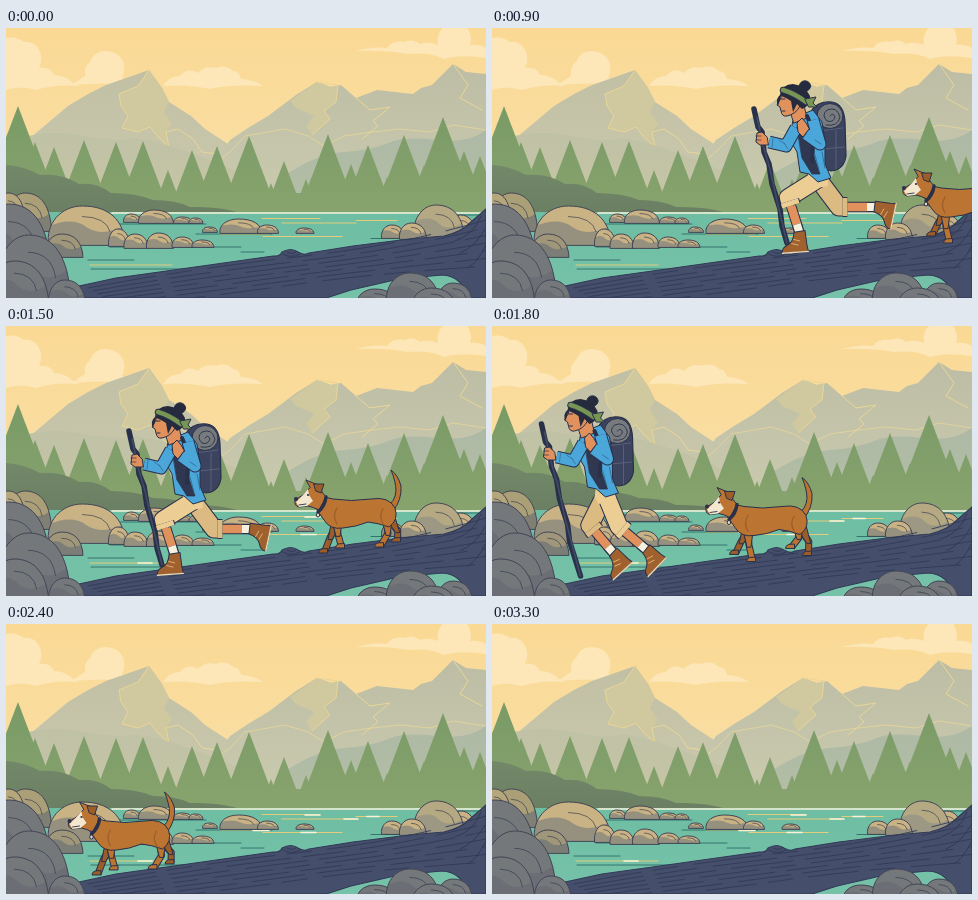
These frames come from a looping animation (480x270 px, 3600 ms). An HTML page with a canvas:

```html
<!DOCTYPE html>
<html lang="en">
<head>
<meta charset="utf-8">
<title>River hike</title>
<style>
html, body { margin: 0; height: 100%; overflow: hidden; background: #fbda95; }
canvas { display: block; width: 100vw; height: 100vh; }
</style>
</head>
<body>
<canvas id="stage" width="480" height="270"></canvas>
<script>
const canvas = document.getElementById('stage');
const ctx = canvas.getContext('2d');
const LOOP = 3600, STEP = 150;
const INK = '#29304a';

const mix = (a, b, k) => a + (b - a) * k;

function shape(d, fill, line, width = 1) {
  const path = new Path2D(d);
  if (fill) { ctx.fillStyle = fill; ctx.fill(path); }
  if (line) { ctx.strokeStyle = line; ctx.lineWidth = width; ctx.stroke(path); }
}

function oval(x, y, rx, ry, fill, line = INK) {
  ctx.beginPath();
  ctx.ellipse(x, y, rx, ry, 0, 0, Math.PI * 2);
  ctx.fillStyle = fill;
  ctx.fill();
  if (line) { ctx.strokeStyle = line; ctx.lineWidth = 1; ctx.stroke(); }
}

// Outlined tube through a list of points
function limb(points, width, color) {
  const d = 'M' + points.map(p => p.join(' ')).join('L');
  ctx.lineCap = 'butt';
  shape(d, null, INK, width + 2);
  shape(d, null, color, width);
  ctx.lineCap = 'round';
}

function at(x, y, angle, draw) {
  ctx.save();
  ctx.translate(x, y);
  ctx.rotate(angle * Math.PI / 180);
  draw();
  ctx.restore();
}

function fade(y0, y1, top, bottom) {
  const g = ctx.createLinearGradient(0, y0, 0, y1);
  g.addColorStop(0, top);
  g.addColorStop(1, bottom);
  return g;
}

// Value at a step from sparse [step, value] keys
function keyed(keys, s) {
  let i = 0;
  while (i < keys.length - 2 && s > keys[i + 1][0]) i++;
  const [a, b] = [keys[i], keys[i + 1]];
  return mix(a[1], b[1], (s - a[0]) / (b[0] - a[0]));
}

/* ---------- landscape ---------- */

function sky() {
  ctx.fillStyle = fade(0, 150, '#fad994', '#f9dea4');
  ctx.fillRect(0, 0, 480, 270);
  const cloud = '#fde7b9';
  shape('M0 10Q10 8 18 14Q29 12 34 24Q37 32 33 40Q44 38 48 47Q58 47 66 54L73 58Q48 56 30 62Q14 57 0 62Z', cloud);
  shape('M66 57Q74 51 79 48Q78 38 84 34Q88 23 100 23Q114 24 118 36Q119 44 116 50Q124 52 130 57Q98 54 66 57Z', cloud);
  shape('M157 58Q163 48 174 48Q182 39 192 45Q199 37 210 40Q219 36 227 43Q233 43 235 51Q249 52 257 58Q222 56 204 61Q182 56 157 58Z', cloud);
  shape('M350 23Q368 18 381 20Q387 12 398 14Q407 10 414 16Q422 13 432 17Q430 3 440 -2H460Q467 8 464 17Q473 16 480 20V30Q454 26 438 31Q424 24 402 26Q380 22 350 23Z', cloud);
}

function mountains() {
  const rim = '#e9d697', snow = '#d0c89f';
  shape('M0 128L24 110L62 78L82 66L100 57L143 42L156 60L163 74L185 88L199 101L222 116L260 150V190H0Z', fade(45, 150, '#c1c0a5', '#c9c8ac'));
  shape('M143 42L156 60L163 74L158 84L166 96L160 104L163 119L151 108L144 99L132 104L116 100L122 88L115 78L113 66L132 58Z', snow);
  shape('M143 42L132 58L113 66L115 78L122 88L116 100L132 104L144 99L151 108L163 119L160 104L172 101L187 111L196 124L212 126', null, rim);
  shape('M205 140L224 112L242 100L262 88L290 67L311 54L325 59L335 57L350 70L371 62L407 66L415 60L426 57L447 36L460 44L480 46V190H205Z', fade(45, 150, '#bdbea5', '#c8c8ad'));
  shape('M311 54L325 59L332 57L330 74L318 83L324 91L306 107L300 98L308 88L290 80L284 73Z', snow);
  shape('M311 54L332 57L330 74L318 83L324 91L306 107M350 70L364 82L384 79L367 93L372 98L356 111M447 36L462 57L454 70L476 82', null, rim);
  shape('M205 139L225 123L239 108L262 104L279 101L302 108L318 118L338 108L366 104L394 101L424 104L447 97L480 102', null, rim, .8);
  shape('M278 148Q310 126 338 124T382 115T430 112T480 102V190H278Z', fade(102, 170, '#adb9a5', '#b4bea6'));
  shape('M0 116Q35 100 72 107T126 111T210 134L260 155V190H0Z', fade(98, 165, '#bfc1a6', '#c5c5a5'));
}

function forest() {
  const green = fade(84, 184, '#7a9b66', '#88a36e');
  const tree = (x, y) => {
    const half = (186 - y) * .38;
    shape(`M${x} ${y}L${x + half} 186H${x - half}Z`, green);
  };
  ctx.fillStyle = '#89a370';
  ctx.fillRect(0, 165, 480, 20);
  [[12, 78], [29, 114], [48, 119], [78, 112], [110, 114], [137, 113], [162, 142], [186, 122],
   [211, 118], [243, 108], [265, 155], [278, 133], [300, 151], [322, 106], [345, 136],
   [362, 117], [381, 149], [398, 107], [418, 137], [437, 89], [458, 123], [474, 128]]
    .forEach(t => tree(...t));
  shape('M0 137Q18 138 34 147Q56 145 73 156Q91 154 105 165Q130 165 147 172Q170 172 184 179Q213 178 235 185H0Z', fade(136, 185, '#738869', '#6b8062'));
}

function line(x0, x1, y, color, width = 1.1) {
  shape(`M${x0} ${y}H${x1}`, null, color, width);
}

function water(s) {
  ctx.fillStyle = fade(184, 270, '#6ebea4', '#76c2a8');
  ctx.fillRect(0, 184, 480, 86);
  line(106, 480, 185, '#f7f2da', 1.6);
  const gold = '#e3cd7c', deep = '#34746f';
  [[256, 314, 190.5], [276, 350, 195], [350, 391, 192.5], [214, 263, 206.5], [257, 336, 208.5], [84, 166, 237]]
    .forEach(([a, b, y]) => line(a, b, y, gold, 1.2));
  [[108, 200, 196], [190, 266, 206], [104, 235, 219], [365, 472, 210.5], [82, 128, 232], [85, 187, 241], [235, 258, 224], [444, 472, 187]]
    .forEach(([a, b, y]) => line(a, b, y, deep, 1));
  if (s < 9) return;
  [[299, 314, 191], [338, 352, 195], [361, 373, 192.5], [247, 263, 206.5], [295, 310, 208.5], [132, 146, 237]]
    .forEach(([a, b, y]) => line(a, b, y, '#fbf3d8', 1.6));
}

// Dome-shaped boulder with a lit cap and a crack
function rock(x, base, w, h, body, cap) {
  const l = x - w / 2, r = x + w / 2, top = base - h;
  const d = `M${l} ${base}C${l - w * .04} ${base - h * .55} ${x - w * .34} ${top} ${x - w * .06} ${top}`
    + `C${x + w * .28} ${top} ${r - w * .02} ${base - h * .65} ${r} ${base}Z`;
  ctx.save();
  shape(d, body);
  ctx.clip(new Path2D(d));
  shape(`M${l - 2} ${base - h * .45}Q${x - w * .2} ${base - h * .75} ${x} ${base - h * .45}`
    + `Q${x + w * .2} ${base - h * .2} ${r} ${base - h * .5}V${top - 3}H${l - 2}Z`, cap);
  shape(`M${x - w * .06} ${base - h * .73}Q${x + w * .25} ${base - h * .72} ${x + w * .3} ${base - h * .34}`, null, INK, .6);
  ctx.restore();
  shape(d, null, '#424556', 1);
}

function riverRocks() {
  const grey = '#96917f', tan = '#c9b284';
  const list = [
    [22, 203, 47, 38, '#7f7f74', '#ab9f78'], [4, 194, 30, 29, '#7f7f74', '#b5a67c'], [81, 217, 77, 39, grey, tan],
    [126, 194, 17, 8, grey, tan], [150, 195, 35, 13, grey, tan], [177, 195, 19, 6, grey, tan], [190, 195, 14, 5, grey, tan],
    [204, 204, 15, 5, grey, tan], [235, 205, 42, 14, grey, tan], [262, 205, 21, 8, grey, tan], [299, 205, 18, 5, grey, tan],
    [113, 218, 21, 17, grey, tan], [130, 220, 24, 14, grey, tan], [154, 220, 27, 15, grey, tan], [177, 219, 22, 10, grey, tan], [197, 219, 22, 7, grey, tan],
    [58, 229, 38, 23, '#7b7d76', '#a0977a'],
    [387, 210, 23, 13, grey, tan], [456, 207, 27, 20, grey, tan], [433, 211, 51, 34, '#9d9883', '#b5a983'], [407, 211, 27, 16, grey, tan]
  ];
  list.forEach(r => rock(...r));
}

function log() {
  const bark = '#454f6c', grain = '#313a56';
  shape('M66 270L73 258L110 250L182 240L267 228Q274 229 276 224Q285 219 292 224Q299 228 303 225L347 218L403 211L438 208Q456 204 465 194L480 181V270H462Q456 248 436 247L393 251L345 262L320 270Z', bark, grain, 1.2);
  for (let i = 0; i < 7; i++) {
    const k = i * 4.8, dash = i % 3 * 17;
    ctx.setLineDash([68 - i * 3, 12, 25 + dash, 16]);
    shape(`M${82 + i * 5} ${260 + k * .6}C160 ${245 + k} 230 ${236 + k} 290 ${229 + k * .95}S400 ${215 + k} 480 ${192 + k * 1.6}`, null, grain, .9);
  }
  ctx.setLineDash([]);
  shape('M277 226Q285 231 294 226M281 224Q286 227 290 224M475 188Q468 207 449 213M479 201Q469 219 454 225M480 217Q471 235 462 240', null, grain, 1);
}

function frontRocks() {
  const low = '#6b6e74', high = '#75787b';
  [[7, 241, 75, 65, low, high], [27, 271, 75, 64, low, high], [12, 278, 62, 45, low, high], [61, 277, 37, 25, low, high],
   [371, 278, 40, 17, low, high], [449, 276, 35, 21, low, high], [407, 276, 53, 31, low, high], [428, 282, 44, 22, low, high]]
    .forEach(r => rock(...r));
}

/* ---------- hiker ---------- */

const SKIN = '#e0915c', BLUE = '#4ba6d9', NAVY = '#3c435e', HAIR = '#252a3d';
const HIKER_X = [[1, 498], [4, 394], [8, 232], [10, 174], [14, 27], [18, -120]];
const HIKER_Y = [48, 48, 50, 41, 41, 48, 58, 55, 54, 70, 82, 69, 75, 83, 94, 79, 98, 100, 100];

// Ankle offset from the bun and boot angle: passing pose, then long stride
const FAR_LEG = [[20, 151, -42], [69, 121, -78]];
const NEAR_LEG = [[53, 148, -46], [-6, 145, -4]];
const hikerAt = s => [keyed(HIKER_X, s), HIKER_Y[Math.max(0, Math.min(s, 18))]];

function ankle(leg, s) {
  if (s % 2) {
    const a = ankle(leg, s - 1), b = ankle(leg, s + 1);
    const swinging = Math.abs(a[0] - b[0]) > 25;
    return [mix(a[0], b[0], .5), mix(a[1], b[1], .5) - (swinging ? 10 : 0), mix(a[2], b[2], .5)];
  }
  const [x, y] = hikerAt(s), [dx, dy, angle] = leg[s % 4 / 2];
  return [x + dx, y + dy, angle];
}

function drawLeg(leg, s, shorts) {
  const [bx, by] = hikerAt(s), [ax, ay, angle] = ankle(leg, s);
  const hip = [13, 93], foot = [ax - bx, ay - by];
  const dx = foot[0] - hip[0], dy = foot[1] - hip[1], d = Math.hypot(dx, dy);
  const bend = Math.sqrt(Math.max(0, 35 * 35 - d * d / 4));
  const knee = [hip[0] + dx / 2 - dy / d * bend, hip[1] + dy / 2 + dx / d * bend];
  const along = k => [mix(knee[0], foot[0], k), mix(knee[1], foot[1], k)];
  limb([knee, foot], 8.5, SKIN);
  limb([along(.8), along(1.08)], 8, '#f6f0df');
  at(...foot, angle, () => {
    shape('M-5 1L6 0L7 15L8 21L-18 21Q-19 16 -12 13Q-6 10 -5 1Z', '#a0612f', INK);
    shape('M-18 21H8', null, '#ead9b5', 1.4);
    shape('M-6 8L0 10M-8 12L-2 14', null, '#e8c07d', .8);
  });
  limb([hip, knee, along(.22)], 17, shorts);
  limb([along(.1), along(.24)], 18, shorts);
}

function stick(s) {
  const stride = [0, .5, 1, .5][s % 4];
  const x = mix(-12, -18, stride), y = mix(175, 157, stride);
  ctx.lineCap = 'round';
  shape(`M-51 23L-47 41L-43 46L-41 66L-36 78L-33 98L-25 123L-23 140L${x} ${y}`, null, INK, 5.5);
  shape(`M-48 31L-42 59L-35 83L-27 119L${x} ${y}`, null, '#424b66', 1.6);
}

function head() {
  shape('M-16 20L-2 15L2 32L-11 37Z', SKIN, INK);
  shape('M-24 6L-24 12L-28 19L-25 21L-24 25Q-23 31 -18 30Q-9 28 -5 20L-4 7L-16 3Z', SKIN, INK);
  shape('M-24 13L-20 13M-23 25L-20 25', null, INK, 1);
  oval(0, 0, 5.6, 5.2, HAIR);
  shape('M-25 9Q-23 -2 -12 -2Q0 -1 5 10Q6 20 -3 23L-8 18L-12 26L-14 15Q-20 11 -24 10L-27 20Q-30 13 -25 9Z', HAIR);
  shape('M-22 4Q-11 7 1 16', null, INK, 6.5);
  shape('M-22 4Q-11 7 1 16', null, '#789653', 4.6);
  shape('M0 13L11 11L8 17L12 21L4 21Z', '#789653', INK);
}

function backpack() {
  shape('M5 27Q12 14 27 16Q39 18 40 36L41 70Q39 84 26 85L10 80Z', NAVY, INK, 1.2);
  shape('M14 45L38 42M18 63L39 61M31 45V83', null, '#5f6880', .8);
  oval(25, 30, 13, 12.5, '#777b7d');
  shape('M25 30Q28 26 30 31Q28 37 22 35Q16 29 22 24Q32 20 35 31Q33 41 21 39', null, INK, .9);
}

function hiker(s) {
  at(...hikerAt(s), 0, () => {
    stick(s);
    backpack();
    drawLeg(FAR_LEG, s, '#dcbb82');
    drawLeg(NEAR_LEG, s, '#ecce94');
    shape('M4 83L22 82L23 100L6 103L2 96Z', '#ecce94');
    shape('M-12 35L-2 28L8 24L17 36L20 55L20 78L26 92L13 96L4 88L-5 86L-8 66L-15 54Z', BLUE, INK);
    shape('M-8 41L0 37L6 62L15 88L7 88L-3 72Z', '#303851', INK, .7);
    limb([[-9, 42], [-19, 60], [-36, 56]], 11, BLUE);
    shape('M-20 58L-26 54M-17 63L-21 57M-32 52L-33 61', null, '#306f96', .8);
    head();
    shape('M-38 51L-43 46L-48 47L-49 56L-45 59L-37 59Z', SKIN, INK);
    shape('M-49 50H-44M-49 54H-44', null, INK, .7);
    shape('M2 30Q10 46 7 75', null, INK, 4);
    limb([[8, 34], [15, 58], [1, 48]], 11, BLUE);
    shape('M4 43L-2 51L-7 46L-8 37L-3 32L1 37Z', SKIN, INK);
    shape('M17 66L20 82M10 69L14 84M10 54L16 58', null, '#306f96', .9);
  });
}

/* ---------- dog ---------- */

const COAT = '#bb7431', SHADE = '#9d5d28';
const DOG_X = [[4, 515], [8, 363], [10, 317], [14, 167], [18, 14]];
const DOG_Y = [[4, 165], [8, 169], [10, 180], [14, 195], [18, 213]];

function paw(center, top, floor, side, phase, color) {
  const x = center - side * 17 * Math.cos(phase);
  const lift = Math.max(0, -side * Math.sin(phase)) * 7;
  const y = floor - lift, hind = center > 40;
  const joint = [mix(top[0], x, .55) + (hind ? 5 : -1), mix(top[1], y, .55)];
  limb([top, joint, [x, y]], 5, color);
  shape(`M${top[0] - 6} ${top[1] - 6}L${joint[0] - 2} ${joint[1] + 2}H${joint[0] + 2}L${top[0] + 7} ${top[1] - 4}Z`, color, INK);
  shape(`M${x + 3} ${y - 3}V${y + 1}H${x - 6}Q${x - 6} ${y - 2} ${x - 3} ${y - 3}Z`, color, INK);
}

function dog(s) {
  const phase = (s - 8) / 3 * Math.PI * 2;
  at(keyed(DOG_X, s), keyed(DOG_Y, s), 0, () => {
    paw(10, [16, 14], 46, -1, phase, SHADE);
    paw(66, [64, 12], 41, 1, phase, SHADE);
    shape('M70 5Q79 -6 78 -20Q75 -31 68 -36Q73 -24 73 -15Q72 -4 64 0Z', COAT, INK);
    paw(66, [63, 12], 40, -1, phase, COAT);
    paw(10, [13, 13], 47, 1, phase, COAT);
    shape('M-3 -11Q3 -8 10 -7Q28 -4 48 -7Q66 -10 72 2Q76 14 66 21Q55 17 45 16Q33 21 20 22Q7 24 1 14L-6 4Z', COAT, INK);
    shape('M60 3Q55 11 61 19M14 2Q9 10 14 18', null, SHADE, 1.2);
    shape('M-13 -19L-17 -26L-10 -23L-4 -21L-1 -14L3 -9L-4 4Q-10 1 -15 0L-24 1Q-29 0 -28 -6L-20 -11Z', COAT, INK);
    shape('M-20 -11L-15 -17L-14 -11L-10 -5L-16 0L-24 1L-27 -4Z', '#f3e7d0');
    oval(-27, -7, 2, 1.9, INK, null);
    oval(-15, -11, 1.1, 1.1, INK, null);
    shape('M-24 -1L-17 -2', null, INK, .9);
    shape('M-9 -22L1 -22L-2 -13L-7 -15Z', SHADE, INK);
    shape('M3 -9Q2 0 -5 6', null, INK, 3.4);
    oval(-5, 9, 1.8, 2, '#e5dcc0');
  });
}

/* ---------- playback ---------- */

function render(s) {
  ctx.lineJoin = ctx.lineCap = 'round';
  sky();
  mountains();
  forest();
  water(s);
  riverRocks();
  log();
  if (s >= 5 && s <= 17) dog(s);
  if (s >= 1 && s <= 16) hiker(s);
  frontRocks();
}

let shown = -1;
function tick() {
  const step = Math.floor(performance.now() % LOOP / STEP);
  if (step !== shown) render(shown = step);
  requestAnimationFrame(tick);
}
tick();
</script>
</body>
</html>
```
